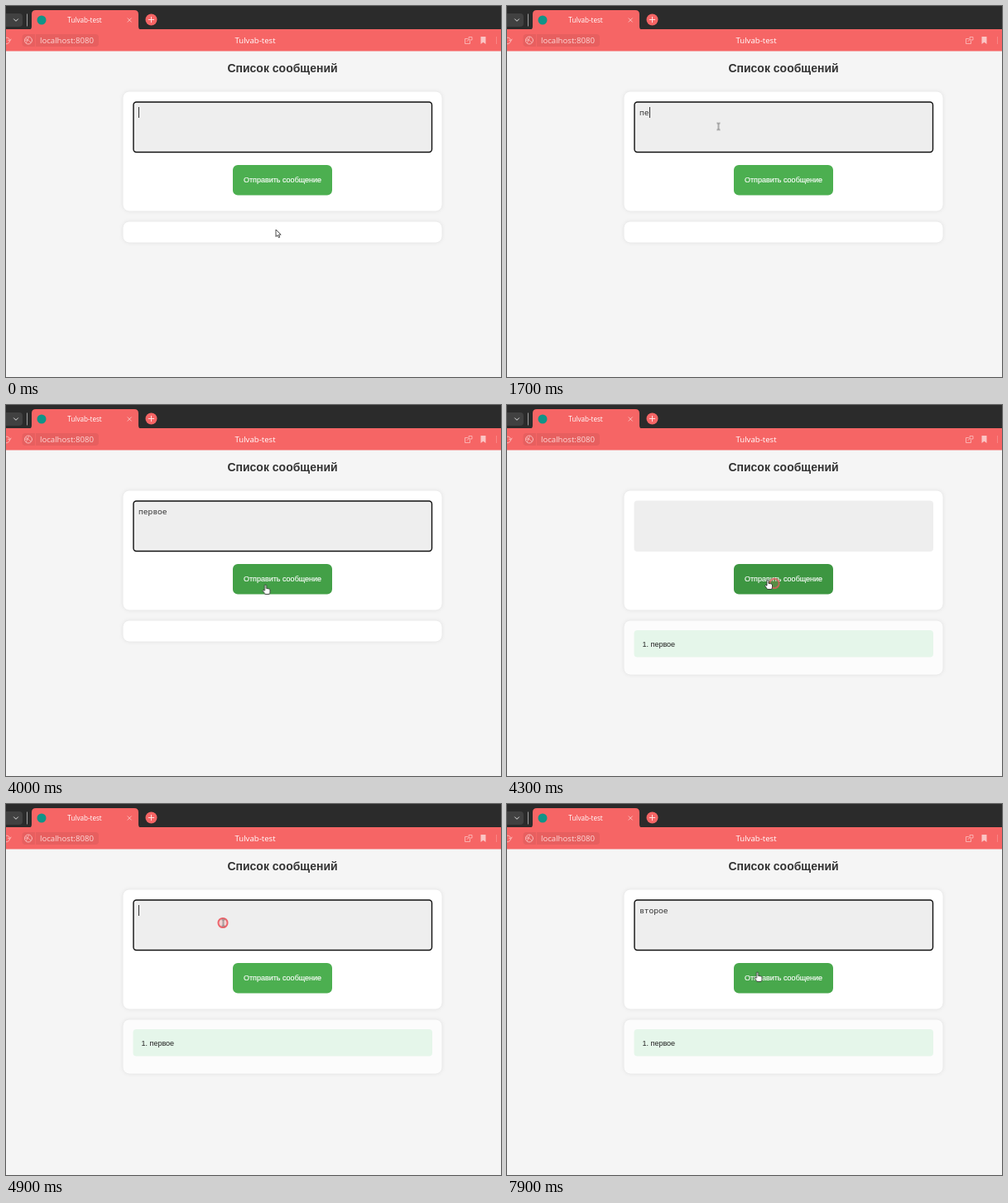
Write an HTML page that moves like this. It is 598 px wide and 448 px high and loops after 8 s.

```html
<!DOCTYPE html>
<html lang="ru">
<head>
<meta charset="utf-8">
<title>Список сообщений</title>
<style>
  html, body { margin: 0; width: 100%; height: 100%; overflow: hidden; background: #f5f5f5; }
  svg { position: absolute; left: 0; top: 0; }
  .ui { font-family: "Open Sans", "Noto Sans", sans-serif; font-size: 9.65px; }
  .page { font-family: "Liberation Sans", Arial, sans-serif; font-size: 9px; }
  .card { fill: #fff; stroke: #ebebeb; filter: drop-shadow(0 0 2px rgb(0 0 0 / .06)); }
  .line { fill: none; stroke: #fbb9b8; stroke-linecap: round; stroke-linejoin: round; }

  /* One 8 s clock for every part; hard changes unless stated otherwise */
  .button, .focus, .item, .list, .ring, .pointer, .pointer g, .word, .caret {
    animation: 8s -10ms step-end infinite;
  }

  .field {
    position: absolute; left: 160px; top: 122px; height: 13px; display: flex;
    font: 9.6px/13px "Noto Sans Mono", "DejaVu Sans Mono", monospace; color: #333; white-space: pre;
  }
  .word { width: 0; overflow: hidden; }
  .caret { width: 1px; background: #333; animation-name: blink; }
  .first { animation-name: type-first; }
  .second { animation-name: type-second; }
  @keyframes type-first {
    0% { width: 0 }
    17.5% { width: 1ch }
    21.25% { width: 2ch }
    28.75% { width: 3ch }
    35% { width: 4ch }
    37.5% { width: 5ch }
    41.25% { width: 6ch }
    53.75%, 100% { width: 0 }
  }
  @keyframes type-second {
    0% { width: 0 }
    70% { width: 1ch }
    75% { width: 2ch }
    77.5% { width: 3ch }
    80% { width: 4ch }
    82.5% { width: 5ch }
    85%, 100% { width: 6ch }
  }
  @keyframes blink {
    0%, 10%, 17.5%, 28.75%, 61.25%, 70% { opacity: 1 }
    3.75%, 16.25%, 27.5%, 47.5%, 67.5%, 92.5%, 100% { opacity: 0 }
  }

  .focus { animation-name: focus; }
  @keyframes focus {
    0%, 61.25%, 100% { opacity: 1 }
    52.5% { opacity: 0 }
  }

  .list { animation-name: grow; }
  .item { animation-name: arrive; }
  @keyframes grow {
    0% { height: 26px; fill: #fff }
    53.75%, 100% { height: 66px; fill: #fcfcfc }
  }
  @keyframes arrive {
    0% { opacity: 0 }
    53.75%, 100% { opacity: 1 }
  }

  .button { animation-name: press; animation-timing-function: linear; }
  @keyframes press {
    0%, 38.75%, 58.75%, 97.5% { fill: #4caf50 }
    41.25%, 52.5% { fill: #43a047 }
    55%, 56.25% { fill: #388e3c }
    100% { fill: #45a349 }
  }

  .ring { fill: rgb(240 90 90 / .2); stroke: #ee5860; stroke-width: 2; opacity: 0; animation-timing-function: linear; }
  .ring.send { animation-name: ring-send; }
  .ring.edit { animation-name: ring-edit; }
  @keyframes ring-send {
    0%, 52.49% { opacity: 0 }
    52.5% { opacity: .9; r: 5px }
    55% { opacity: .6; r: 6.3px }
    58.75%, 100% { opacity: 0; r: 7px }
  }
  @keyframes ring-edit {
    0%, 61.24% { opacity: 0 }
    61.25% { opacity: .95; r: 5.5px }
    65%, 100% { opacity: 0; r: 7px }
  }

  .pointer { animation-name: travel; }
  @keyframes travel {
    0% { transform: translate(326px, 270px) }
    1.25% { transform: translate(334px, 240px) }
    2.5% { transform: translate(328px, 160px) }
    3.75% { transform: translate(300px, 73px) }
    5% { transform: translate(274px, 92px) }
    6.25% { transform: translate(259px, 128px) }
    7.5% { transform: translate(255.5px, 145.5px) }
    37.5% { transform: translate(262px, 152px) }
    38.75% { transform: translate(280px, 179px) }
    40% { transform: translate(302px, 208px) }
    41.25% { transform: translate(313.5px, 217px) }
    51.25% { transform: translate(318px, 217px) }
    52.5% { transform: translate(323px, 215.5px) }
    53.75% { transform: translate(315px, 211px) }
    55% { transform: translate(281.5px, 186px) }
    56.25% { transform: translate(268px, 160px) }
    57.5% { transform: translate(262px, 146px) }
    58.75% { transform: translate(262.5px, 143.5px) }
    93.75% { transform: translate(264px, 150px) }
    95% { transform: translate(270px, 165px) }
    96.25% { transform: translate(282px, 183px) }
    97.5% { transform: translate(295px, 197px) }
    98.75%, 100% { transform: translate(302.5px, 203px) }
  }
  .pointer .arrow { animation-name: arrow; }
  .pointer .beam { animation-name: beam; }
  .pointer .hand { animation-name: hand; }
  @keyframes arrow {
    0%, 38.75%, 55%, 96.25% { opacity: 1 }
    6.25%, 40%, 56.25%, 97.5%, 100% { opacity: 0 }
  }
  @keyframes beam {
    0%, 38.75%, 96.25%, 100% { opacity: 0 }
    6.25%, 56.25% { opacity: 1 }
  }
  @keyframes hand {
    0%, 55% { opacity: 0 }
    40%, 97.5%, 100% { opacity: 1 }
  }
</style>
</head>
<body>
<svg width="598" height="448" viewBox="0 0 598 448">
  <rect width="598" height="448" fill="#f5f5f5"/>

  <g class="ui">
    <rect width="598" height="28.5" fill="#2b2b2b"/>
    <rect x="-8" y="9" width="28" height="16" rx="4" fill="#414141"/>
    <path class="line" d="M9.5 15.8l2.5 2.5 2.5-2.5" style="stroke:#ddd"/>
    <path d="M25.5 9.5v15" stroke="#a0a0a0"/>
    <path d="M28 28.5q3 0 3-4V10q0-5 5-5h119q5 0 5 5v14.500q0 4 3 4z" fill="#f66565"/>
    <rect y="28" width="598" height="26.500" fill="#f66565"/>
    <circle cx="43" cy="17" r="5.500" fill="#109488"/>
    <text x="95" y="20" text-anchor="middle" font-size="8.1" fill="#fff">Tulvab-test</text>
    <path class="line" d="M147 14.800l4.400 4.400m0-4.400l-4.400 4.400"/>
    <circle cx="175.500" cy="16.500" r="7" fill="#f66565"/>
    <path class="line" d="M172.300 16.500h6.400m-3.200-3.200v6.400" style="stroke:#fdd"/>

    <path class="line" d="M0 38.200a4 4 0 0 1 4.500 3.300a4 4 0 0 1-4.500 4.300M2.500 41.300l2.200 1 1.300-2.200"/>
    <rect x="19.500" y="34" width="92.500" height="15" rx="4" fill="#e75f5f"/>
    <path d="M35.500 34v15" stroke="#f66565"/>
    <circle class="line" cx="27" cy="41.500" r="4.500"/>
    <path class="line" d="M24 39l6 5m-5.500.500l3-6.500m-4.800 3.200h4" stroke-width=".8"/>
    <text x="41" y="45" fill="#fdd9d8">localhost:8080</text>
    <text x="301" y="45" text-anchor="middle" fill="#fff">Tulvab-test</text>
    <path class="line" d="M557.500 39.500h-3v6h6v-3m-1-5h3.500v3.500h-3.500zm-2.500 5l2-2" stroke-width=".9"/>
    <path d="M573.500 37h6v9l-3-2.300-3 2.300z" fill="#fbc5c4"/>
    <path d="M592.500 37v9" stroke="#f88686"/>
  </g>

  <g class="page">
    <text x="334" y="80" text-anchor="middle" font-size="14" font-weight="bold" fill="#333">Список сообщений</text>
    <rect class="card" x="141" y="103" width="386" height="145" rx="8"/>
    <rect x="153.500" y="115.500" width="361.500" height="61.500" rx="4" fill="#eee"/>
    <rect class="focus" x="154" y="116" width="360.500" height="60.500" rx="3.500" fill="none" stroke="#111" stroke-width="1.400"/>
    <rect class="button" x="274" y="192" width="120" height="36.500" rx="6" fill="#4caf50"/>
    <text x="334" y="213" text-anchor="middle" fill="#fff" stroke="#fff" stroke-width=".15">Отправить сообщение</text>

    <rect class="card list" x="141" y="260" width="386" height="26" rx="8"/>
    <g class="item">
      <rect x="153.500" y="272" width="361.500" height="32.500" rx="4" fill="#e5f6ea"/>
      <text x="163.500" y="291.500" fill="#222">1. первое</text>
    </g>
  </g>
</svg>

<div class="field"><span class="word first">первое</span><span class="word second">второе</span><i class="caret"></i></div>

<svg width="598" height="448" viewBox="0 0 598 448">
  <circle class="ring send" cx="323" cy="215.500" r="6"/>
  <circle class="ring edit" cx="262" cy="143.500" r="6"/>
  <g class="pointer">
    <g class="arrow" fill="#fff" stroke="#222" stroke-width=".8" stroke-linejoin="round">
      <path d="M0 0v8.500l2-1.800 1.400 3 1.400-.6-1.300-3h2.700z"/>
    </g>
    <g class="beam" fill="none" stroke="#555" stroke-width=".9">
      <path d="M-2-4h1.500l.5.500.5-.500H2M0-3.500v7M-2 4h1.500l.5-.500.5.500H2"/>
    </g>
    <g class="hand" fill="#fff" stroke="#222" stroke-width=".8" stroke-linejoin="round">
      <path d="M-1 1q0-1 1-1t1 1v3.500q3.500 0 4.500 1.300v3q0 1.200-1 2.700H-.5q-1-2-3-4.300q.5-1.500 2.500 0z"/>
    </g>
  </g>
</svg>
</body>
</html>
```
